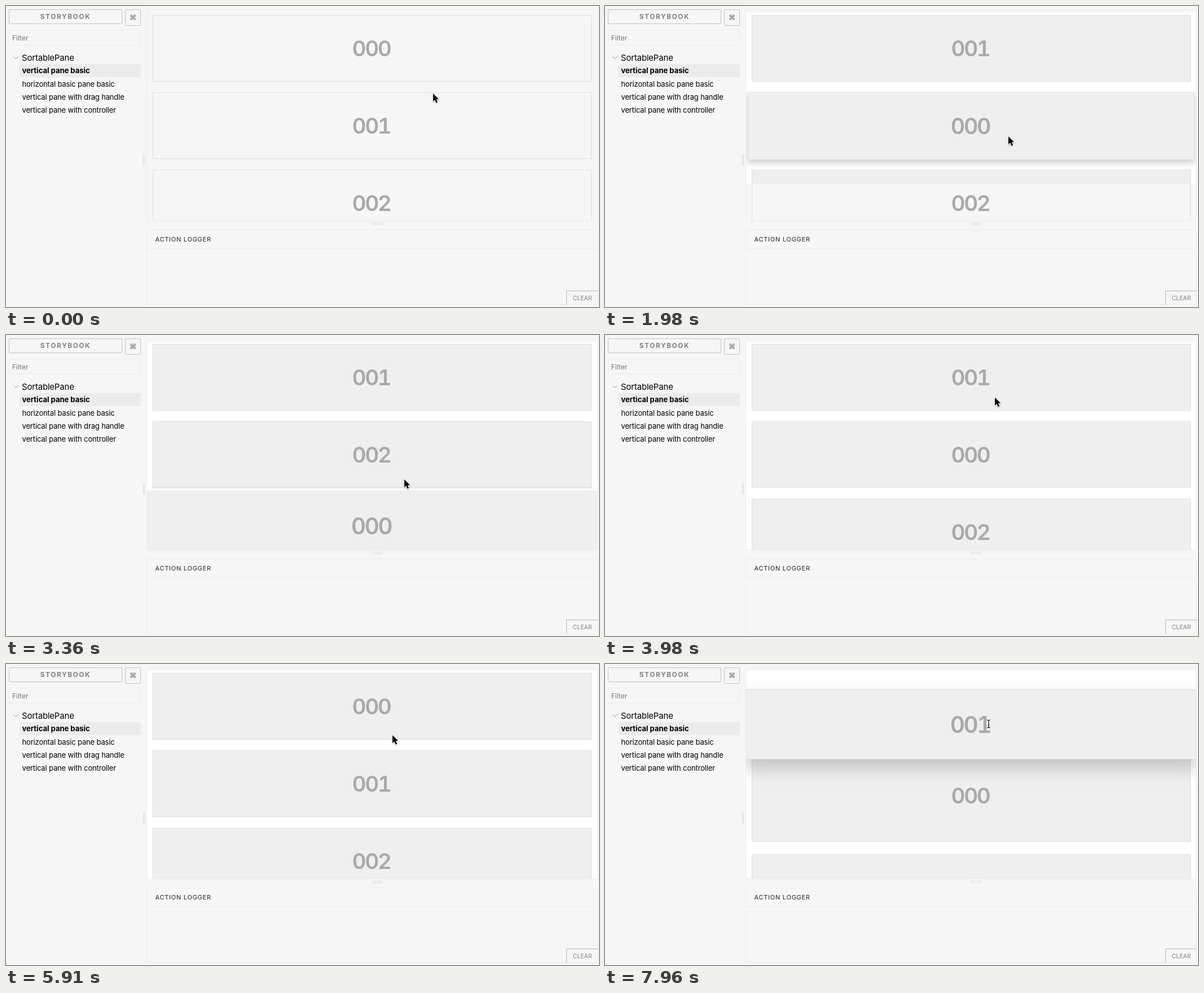
These frames come from a looping animation (1051 by 533 pixels, 8 s). An HTML page:

```html
<!DOCTYPE html>
<html lang="en">
<head>
<meta charset="utf-8">
<title>Sortable panes</title>
<style>
  html, body { margin: 0; width: 100%; height: 100%; overflow: hidden; background: #f6f6f6; }
  body { position: relative; font: 13px Inter, sans-serif; color: #000; }
  body * { position: absolute; box-sizing: border-box; white-space: nowrap; }
  .button { border: 1px solid #c1c1c1; border-radius: 2px; color: #828282; text-align: center; font-weight: 700; }
  .box { border: 1px solid #ececec; border-radius: 4px; }
  .story { left: 24px; width: 215px; height: 23px; padding-left: 4.5px; line-height: 23px; letter-spacing: -.15px; }
  .active { background: #ebebeb; font-weight: 700; letter-spacing: 0; }
  #stage { left: 249px; top: 6px; width: 800px; height: 375px; overflow: hidden; isolation: isolate; }
  .pane { left: 10px; top: 0; width: 778px; border: 1px solid #dcdcdc; }
  .pane b { left: 0; right: 0; top: 50%; height: 60px; margin-top: -30px; text-align: center; text-indent: -3px;
    font: 600 38.5px/60px Inter, sans-serif; font-variant-numeric: tabular-nums; letter-spacing: -2.2px; color: #a9a9a9; }
  .grip { border: solid #d8d8d8; }
  #pointer { left: 0; top: 0; width: 1px; height: 1px; overflow: visible; }
</style>
</head>
<body>
  <div class="button" style="left:5px;top:6px;width:201px;height:26px;font-size:12px;line-height:24px;letter-spacing:1.5px">STORYBOOK</div>
  <div class="button" style="left:211px;top:6px;width:28px;height:29px;font:700 13px/27px 'DejaVu Sans',sans-serif">⌘</div>
  <div class="box" style="left:5px;top:42px;width:234px;height:28px;border-radius:2px;padding-left:5px;font-size:12px;line-height:27px;color:#747474">Filter</div>

  <svg style="left:12px;top:86px" width="11" height="11" fill="none" stroke="#8c8c8c"><path d="M1.5 3.5l4 4 4-4"/></svg>
  <div style="left:28px;top:81px;font-size:15px;line-height:21px;letter-spacing:-.2px">SortablePane</div>
  <div class="story active" style="top:103px">vertical pane basic</div>
  <div class="story" style="top:127px">horizontal basic pane basic</div>
  <div class="story" style="top:150px">vertical pane with drag handle</div>
  <div class="story" style="top:173px">vertical pane with controller</div>

  <div class="grip" style="left:243px;top:263px;width:3px;height:19px;border-width:0 1px"></div>
  <div class="grip" style="left:648px;top:384px;width:20px;height:4px;border-width:1px 0"></div>

  <div id="stage" class="box"></div>

  <div class="box" style="left:249px;top:396px;width:800px;height:133px">
    <div style="left:0;top:0;width:798px;height:33px;padding-left:14.5px;border-bottom:1px solid #ececec;font-size:11px;line-height:33px;letter-spacing:.75px;color:#222">ACTION LOGGER</div>
    <div style="right:-1px;bottom:-1px;width:56px;height:25px;border:solid #b5b5b5;border-width:1px 0 0 1px;border-radius:2px 0 0 0;text-align:center;font-size:10.5px;line-height:25px;color:#828282">CLEAR</div>
  </div>

  <svg id="pointer" stroke-linejoin="round">
    <g id="arrow" style="filter:drop-shadow(0 1px 1px #0005)">
      <path d="M0 0V14L3.2 11 5.5 16.4 8 15.3 5.7 10.1H10Z" stroke="#fff" stroke-width="1.4" paint-order="stroke"/>
    </g>
    <g id="resize" style="filter:drop-shadow(0 1px 1px #0004)">
      <path transform="translate(0 7)" stroke="#fff" stroke-width="2" paint-order="stroke"
        d="M-8-1H-.8V-4.5H-3.5L0-8 3.5-4.5H.8V-1H8V1H.8V4.5H3.5L0 8-3.5 4.5H-.8V1H-8Z"/>
    </g>
    <g id="beam" fill="none">
      <path id="stem" d="M-3-7Q0-7 0-5 0-7 3-7M0-5V5M-3 7Q0 7 0 5 0 7 3 7M-1.5 2H1.5" stroke="#fff" stroke-width="3"/>
      <use href="#stem"/>
      <path d="M-3-7Q0-7 0-5 0-7 3-7M0-5V5M-3 7Q0 7 0 5 0 7 3 7M-1.5 2H1.5" stroke="#000" stroke-width="1.1"/>
    </g>
  </svg>

<script>
const LOOP = 8000, FRAME = 90;
const STAGE_TOP = 7, FIRST_TOP = 16, PANE_H = 118, GAP = 19;
const LAG = 130;      // a dragged pane trails the pointer
const SETTLE = 75;    // time constant of the springs

// the pointer glides to each stop in turn
const glides = [
  { from: 0, to: 1, x: 757, y: 155 },
  { from: 50, to: 210, x: 720, y: 93 },
  { from: 1020, to: 1630, x: 715, y: 231 },
  { from: 2240, to: 2670, x: 708, y: 365 },
  { from: 3190, to: 3630, x: 705, y: 205 },
  { from: 3700, to: 4150, x: 690, y: 103 },
  { from: 4410, to: 4590, x: 690, y: 232 },
  { from: 4780, to: 5560, x: 685, y: 126 },
  { from: 6340, to: 6770, x: 685, y: 173 },
  { from: 7200, to: 7377, x: 680, y: 258 },
  { from: 7460, to: 7790, x: 680, y: 106 }
];

const grabs = [
  { pane: 0, from: 660, to: 1904 },
  { pane: 0, from: 2240, to: 2800 },
  { pane: 0, from: 3060, to: 3660 },
  { pane: 1, from: 4410, to: 4760 },
  { pane: 0, from: 6340, to: 6919, resize: true },
  { pane: 1, from: 7460, to: LOOP }
];
const pull = grabs.find(grab => grab.resize);

const orders = [
  { from: 0, list: '012' }, { from: 1250, list: '102' }, { from: 2450, list: '120' },
  { from: 3410, list: '102' }, { from: 4527, list: '012' }, { from: 7634, list: '102' }
];

const shapes = [
  { from: 0, id: 'arrow' }, { from: 5550, id: 'resize' }, { from: 5850, id: 'arrow' },
  { from: 6165, id: 'resize' }, { from: 7250, id: 'arrow' }, { from: 7340, id: 'beam' }
];

const $ = id => document.getElementById(id);
const stage = $('stage');
const panes = ['000', '001', '002'].map(label => {
  const pane = document.createElement('div');
  pane.className = 'pane';
  pane.innerHTML = `<b>${label}</b>`;
  return stage.appendChild(pane);
});

const lastIndex = (list, t) => list.filter(item => item.from <= t).length - 1;
const mix = (a, b, u) => a + (b - a) * u;
const easeOut = u => 1 - (1 - u) ** 3;

// share of a spring's way that is still left
function left(dt) {
  const rest = Math.exp(-dt / SETTLE);
  return rest < .005 ? 0 : rest;
}

function pointerAt(t) {
  const i = lastIndex(glides, t), stop = glides[i], start = glides[Math.max(0, i - 1)];
  const u = easeOut(Math.min(1, (t - stop.from) / (stop.to - stop.from)));
  return { x: mix(start.x, stop.x, u), y: mix(start.y, stop.y, u) };
}

function heightOf(pane, t) {
  if (pane !== pull.pane || t < pull.from) return PANE_H;
  return PANE_H + pointerAt(Math.min(t, pull.to)).y - pointerAt(pull.from).y;
}

function slotTop(pane, t) {
  const i = lastIndex(orders, t);
  const topIn = ({ list }) => [...list.slice(0, list.indexOf(pane))]
    .reduce((top, id) => top + heightOf(+id, t) + GAP, FIRST_TOP);
  return mix(topIn(orders[i]), topIn(orders[Math.max(0, i - 1)]), left(t - orders[i].from));
}

function dragTop(grab, t) {
  return slotTop(grab.pane, grab.from) + pointerAt(Math.max(grab.from, t - LAG)).y - pointerAt(grab.from).y;
}

function topOf(pane, t, grab) {
  const slot = slotTop(pane, t);
  if (!grab || grab.pane !== pane || grab.resize) return slot;
  if (t < grab.to) return dragTop(grab, t);
  return mix(slot, dragTop(grab, grab.to), left(t - grab.to));
}

function liftOf(grab, t) {
  const lift = t < grab.to ? 1 - left(t - grab.from + 60) : left(t - grab.to);
  return lift < .1 ? 0 : lift;
}

function draw(t) {
  const grab = grabs[lastIndex(grabs, t)];
  const tops = panes.map((_, i) => topOf(i, t, grab));

  // the stage lights up as far down as the first pane's shadow has reached
  const lit = !grab ? 0 : t < 2600 ? tops[0] + 162 : 380;
  stage.style.background =
    `linear-gradient(#f6f6f6 5px, #fff 0, #fff ${lit - STAGE_TOP}px, #f6f6f6 0)`;

  panes.forEach((pane, i) => {
    const active = grab && grab.pane === i;
    const lift = active ? liftOf(grab, t) : 0;
    Object.assign(pane.style, {
      height: heightOf(i, t) + 'px',
      transform: `translateY(${tops[i] - STAGE_TOP}px) scale(${1 + .05 * lift})`,
      boxShadow: lift ? `0 ${15 * lift}px ${30 * lift}px rgba(0,0,0,.2)` : 'none',
      zIndex: active ? 1 : 0,
      background: `linear-gradient(#efefef ${Math.max(0, lit >= 380 ? 999 : lit - tops[i])}px, #f6f6f6 0)`
    });
  });

  const { id } = shapes[lastIndex(shapes, t)], { x, y } = pointerAt(t);
  for (const shape of ['arrow', 'resize', 'beam']) $(shape).style.display = shape === id ? '' : 'none';
  $('pointer').style.transform = `translate(${x}px, ${y}px)`;
}

function tick() {
  const t = performance.now() % LOOP;
  draw(Math.floor((t + 10) / FRAME) * FRAME);
  requestAnimationFrame(tick);
}
tick();
</script>
</body>
</html>
```
